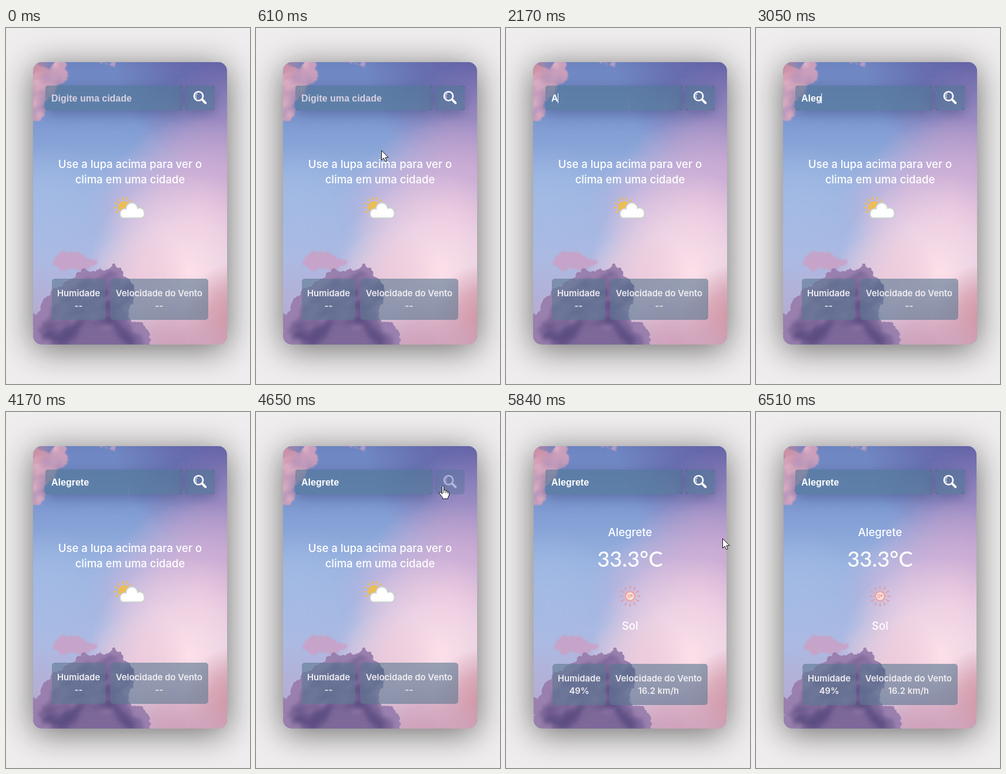
These frames come from a looping animation (415x605 px, 7460 ms). An HTML page with a canvas:

```html
<!DOCTYPE html>
<html lang="pt-BR">
<head>
<meta charset="utf-8">
<title>Clima</title>
<style>
  html, body { margin: 0; width: 100%; height: 100%; overflow: hidden; background: #efedee; }
  canvas { display: block; }
</style>
</head>
<body>
<canvas id="stage" width="415" height="605"></canvas>
<script>
const W = 415, H = 605, LOOP = 7460, STEP = 69;
const ctx = document.getElementById('stage').getContext('2d');
const HEADING = '500 18.5px Inter, sans-serif';
const STAT = '600 14.8px Inter, sans-serif';
const DEGREES = '500 36.5px Lato, sans-serif';
const FIELD = 'bold 16px "Liberation Sans", Arial, sans-serif';
const RESULT_AT = 5040;

const typed = [[2170, 'A'], [2370, 'l'], [2500, 'e'], [3050, 'g'],
               [3250, 'r'], [3380, 'e'], [3510, 't'], [3640, 'e']];

function seeded(seed) {
  return () => (seed = seed * 16807 % 2147483647) / 2147483647;
}

// Closed outline roughened by midpoint displacement.
function roughPath(points, random, wobble = .3) {
  const path = new Path2D();
  const split = (ax, ay, bx, by, depth) => {
    if (!depth) return path.lineTo(bx, by);
    const k = (random() - .5) * wobble * 2;
    const mx = (ax + bx) / 2 + (by - ay) * k, my = (ay + by) / 2 - (bx - ax) * k;
    split(ax, ay, mx, my, depth - 1);
    split(mx, my, bx, by, depth - 1);
  };
  path.moveTo(...points[0]);
  points.forEach((p, i) => split(...p, ...points[(i + 1) % points.length], 3));
  path.closePath();
  return path;
}

function paintSky() {
  const layer = document.createElement('canvas');
  layer.width = W;
  layer.height = H;
  const c = layer.getContext('2d');
  const random = seeded(71);

  const base = c.createLinearGradient(0, 58, 0, 538);
  [[0, '#6d84c0'], [.2, '#7c98d0'], [.42, '#98b3e0'], [.7, '#adb9e2'], [1, '#b9a6ca']]
    .forEach(([at, color]) => base.addColorStop(at, color));
  c.fillStyle = base;
  c.fillRect(0, 0, W, H);

  const glow = (x, y, r, rgb, alpha) => {
    const g = c.createRadialGradient(x, y, 0, x, y, r);
    g.addColorStop(0, `rgba(${rgb},${alpha})`);
    g.addColorStop(.5, `rgba(${rgb},${alpha * .65})`);
    g.addColorStop(1, `rgba(${rgb},0)`);
    c.fillStyle = g;
    c.fillRect(0, 0, W, H);
  };
  glow(385, 50, 200, '98,92,162', .9);
  glow(385, 225, 170, '180,150,200', .9);
  glow(225, 300, 90, '196,180,220', .6);
  glow(330, 310, 160, '222,184,218', .9);
  glow(310, 415, 170, '253,224,232', 1);
  glow(225, 430, 90, '240,200,216', .7);
  glow(390, 490, 90, '208,142,156', .9);
  glow(290, 550, 100, '208,156,180', .9);
  glow(70, 310, 110, '166,190,230', .6);

  const fill = (points, color, blur = 0) => {
    const path = roughPath(points, random);
    c.filter = blur ? `blur(${blur}px)` : 'none';
    c.fillStyle = color;
    c.fill(path);
    c.filter = 'none';
    return path;
  };
  // Soft wisps scattered inside a cloud.
  const mottle = (path, count, x, y, w, h, colors) => {
    c.save();
    c.clip(path);
    c.filter = 'blur(3px)';
    for (let i = 0; i < count; i++) {
      c.fillStyle = colors[i % colors.length];
      c.beginPath();
      c.ellipse(x + random() * w, y + random() * h, 5 + random() * 12, 3 + random() * 6, -.4, 0, 7);
      c.fill();
    }
    c.restore();
  };

  const corner = fill([[40, 50], [108, 50], [100, 70], [106, 82], [86, 98], [82, 114], [66, 124], [66, 146], [40, 156]],
    'rgba(212,162,188,.9)', 1);
  mottle(corner, 24, 44, 56, 60, 96, ['rgba(240,190,200,.6)', 'rgba(176,148,192,.5)']);
  glow(46, 58, 36, '204,134,150', .7);
  fill([[150, 50], [190, 50], [186, 67], [176, 63]], 'rgba(196,162,198,.8)', 1);
  fill([[78, 402], [90, 384], [112, 380], [130, 386], [156, 394], [142, 406], [116, 410], [96, 414]],
    'rgba(202,160,198,.85)', 1);

  const bank = fill([[40, 544], [40, 486], [64, 460], [84, 442], [104, 430], [120, 416], [142, 414], [160, 408],
    [174, 410], [184, 400], [194, 407], [200, 422], [214, 434], [216, 456], [208, 480], [222, 500], [240, 512], [246, 528], [242, 544]],
    '#9a80ae', .6);
  fill([[70, 544], [60, 500], [92, 462], [116, 440], [136, 428], [160, 424], [178, 412], [190, 418], [200, 444],
    [196, 480], [212, 506], [230, 520], [232, 544]], '#7d689a', 3);
  mottle(bank, 40, 56, 415, 180, 105, ['rgba(158,130,176,.4)', 'rgba(94,76,130,.45)']);
  fill([[46, 544], [60, 516], [100, 506], [130, 494], [160, 500], [190, 498], [206, 516], [214, 544]],
    'rgba(86,72,124,.8)', 5);
  return layer;
}
const sky = paintSky();

function box(x, y, w, h, r) {
  ctx.beginPath();
  ctx.roundRect(x, y, w, h, r);
}

function label(text, x, y, font, color = '#fff', align = 'center') {
  ctx.font = font;
  ctx.fillStyle = color;
  ctx.textAlign = align;
  ctx.fillText(text, x, y);
}

function disc(x, y, r) {
  ctx.beginPath();
  ctx.arc(x, y, r, 0, 7);
}

function card(x, w) {
  ctx.fillStyle = '#efedee';
  ctx.fillRect(0, 0, W, H);
  ctx.save();
  ctx.shadowColor = 'rgba(0,0,0,.55)';
  ctx.shadowBlur = 56;
  ctx.shadowOffsetY = 8;
  ctx.fillStyle = '#8d9acb';
  box(x, 58, w, 480, 15);
  ctx.fill();
  ctx.restore();
  ctx.save();
  ctx.clip();
  ctx.drawImage(sky, (x - 46) * 2, 0);
  ctx.restore();
}

function panel(x, y, w, h, color, shadow) {
  ctx.save();
  box(x, y, w, h, 5);
  if (shadow) {
    // Keep the shadow outside the translucent panel.
    ctx.save();
    const outside = new Path2D();
    outside.rect(0, 0, W, H);
    outside.roundRect(x, y, w, h, 5);
    ctx.clip(outside, 'evenodd');
    ctx.shadowColor = 'rgba(70,75,130,.55)';
    ctx.shadowBlur = 22;
    ctx.shadowOffsetY = 5;
    ctx.fillStyle = '#000';
    ctx.fill();
    ctx.restore();
  }
  ctx.fillStyle = color;
  ctx.fill();
  ctx.restore();
}

function searchBar(t, hover) {
  panel(67, 98, 233, 42, 'rgba(80,118,150,.65)', true);
  panel(305, 98, 50, 42, `rgba(80,116,150,${hover ? .4 : .65})`, !hover);

  const text = typed.filter(([at]) => t >= at).map(([, ch]) => ch).join('');
  if (text) label(text, 77, 125, FIELD, '#fff', 'left');
  else label('Digite uma cidade', 77, 125, FIELD, '#d8d0e2', 'left');
  if ((t >= 1320 && t < 1770) || (t >= 2170 && t < 4170)) {
    ctx.font = FIELD;
    ctx.fillStyle = '#fff';
    ctx.fillRect(Math.floor(77 + ctx.measureText(text).width), 111, 1, 17);
  }

  ctx.strokeStyle = hover ? '#b5b5dc' : '#fff';
  ctx.lineCap = 'round';
  ctx.lineWidth = 2.6;
  disc(327.5, 115.8, 7.6);
  ctx.stroke();
  ctx.lineWidth = 1.2;
  ctx.beginPath();
  ctx.arc(327.5, 115.8, 4.6, 2.4, 4.2);
  ctx.stroke();
  ctx.lineWidth = 4;
  ctx.beginPath();
  ctx.moveTo(334.5, 122.5);
  ctx.lineTo(339.3, 127.3);
  ctx.stroke();
}

function partlyCloudy() {
  ctx.strokeStyle = ctx.fillStyle = '#ecbd58';
  disc(201, 304.5, 10.5);
  ctx.fill();
  ctx.lineWidth = 2.8;
  ctx.lineCap = 'round';
  for (let i = 0; i < 7; i++) {
    const a = 2.6 + i * .48, dx = Math.cos(a), dy = Math.sin(a);
    ctx.beginPath();
    ctx.moveTo(201 + dx * 14.5, 304.5 + dy * 14.5);
    ctx.lineTo(201 + dx * 16.5, 304.5 + dy * 16.5);
    ctx.stroke();
  }
  const cloud = (grow, color) => {
    ctx.fillStyle = color;
    for (const [x, y, r] of [[202, 315, 7], [214, 307, 9], [227, 314, 7.5]]) {
      disc(x, y, r + grow);
      ctx.fill();
    }
    box(195 - grow, 311 - grow, 39.5 + 2 * grow, 11 + 2 * grow, 6);
    ctx.fill();
  };
  cloud(2, '#cbd0d0');
  cloud(0, '#fff');
}

function sunny() {
  ctx.strokeStyle = ctx.fillStyle = '#d79fa8';
  ctx.lineWidth = 1.2;
  for (let i = 0; i < 12; i++) {
    const a = i * Math.PI / 6, dx = Math.cos(a), dy = Math.sin(a);
    ctx.beginPath();
    ctx.moveTo(211 + dx * 11.5, 313 + dy * 11.5);
    ctx.lineTo(211 + dx * 15, 313 + dy * 15);
    ctx.stroke();
    disc(211 + dx * 16, 313 + dy * 16, 1.6);
    ctx.fill();
  }
  ctx.fillStyle = '#f8e2e2';
  ctx.strokeStyle = '#efa39c';
  ctx.lineWidth = 2.5;
  disc(211, 313, 7.8);
  ctx.fill();
  ctx.stroke();
  ctx.lineWidth = 1.2;
  ctx.strokeRect(207.5, 310.5, 3, 5);
  ctx.strokeRect(212.5, 310.5, 2, 3);
}

function stats(x1, x2, y, humidity, wind) {
  const ink = '#f0edf2', fill = 'rgba(92,122,148,.62)';
  [[x1, 91, 'Humidade', humidity], [x2, 167, 'Velocidade do Vento', wind]].forEach(([x, w, name, value]) => {
    panel(x, y, w, 70, fill);
    label(name, x + w / 2, y + 30, STAT, ink);
    label(value, x + w / 2, y + 51, STAT, ink);
  });
}

function weather(done) {
  if (done) {
    label('Alegrete', 211, 211, HEADING);
    label('33.3°C', 211, 263, DEGREES);
    sunny();
    label('Sol', 211, 370, HEADING);
    stats(79, 176, 428, '49%', '16.2 km/h');
  } else {
    label('Use a lupa acima para ver o', 211, 238, HEADING);
    label('clima em uma cidade', 211, 264, HEADING);
    partlyCloudy();
    stats(78, 177, 426, '--', '--');
  }
}

function pointer(t) {
  if (t < 130) return null;
  if (t < 890) {
    const left = 1 - Math.min(10, Math.floor((t - 128) / STEP)) / 10;
    return ['arrow', 202 + 163 * left ** 2.24, 148 + 429 * left ** 1.63];
  }
  if (t < 4500) return ['beam', 208, t < 960 ? 138 : t < 1040 ? 136 : 135];
  if (t < 4580) return ['beam', 236, 132];
  if (t < 4650) return ['beam', 285, 128];
  if (t < 5700) return ['hand', t < 4700 ? 318 : t < 4770 ? 326 : 329, 125];
  if (t < 6110) {
    const u = (1 + Math.floor((t - 5700) / STEP)) / 7;
    return ['arrow', 329 + 90 * u, 125 + 270 * u ** 1.3];
  }
  if (t >= 6370 && t < 6510) return t < 6440 ? ['arrow', 404, 548] : ['arrow', 397, 579];
  return null;
}

const arrowShape = new Path2D('M.5.5V16.5L4.2 13L6.8 18.7L9.4 17.6L6.8 12H11.8Z');
const handShape = new Path2D('M-1.5 1.5Q0-1 1.5 1.5V8Q4 6.5 5 9Q7.5 8 8 10.5Q10.5 10 10.5 13V16Q10 18 8.5 20V22.5H-.5V20.5L-6 13.5Q-6.5 11-4 11.5L-1.5 14Z');

function drawPointer([kind, x, y]) {
  ctx.save();
  ctx.translate(Math.round(x), Math.round(y));
  ctx.lineWidth = 1;
  if (kind === 'beam') {
    ctx.strokeStyle = 'rgba(130,145,155,.4)';
    ctx.stroke(new Path2D('M-3-7.5H-1L.5-6.5L2-7.5H4M.5-6.5V7M-3 8H-1L.5 7L2 8H4'));
  } else {
    const shape = kind === 'hand' ? handShape : arrowShape;
    ctx.fillStyle = '#fff';
    ctx.strokeStyle = '#111';
    ctx.fill(shape);
    ctx.stroke(shape);
    if (kind === 'hand') ctx.stroke(new Path2D('M1.5 8V12M5 9V12.5M8 10.5V13'));
  }
  ctx.restore();
}

function click(x, y) {
  ctx.fillStyle = 'rgba(196,204,48,.8)';
  disc(x, y, 12);
  ctx.fill();
}

function draw(t) {
  const done = t >= RESULT_AT;
  card(done ? 47 : 46, done ? 328 : 330);
  searchBar(t, t >= 4650 && t < 5700);
  weather(done);
  const cursor = pointer(t);
  if (cursor) drawPointer(cursor);
  if (t >= 1240 && t < 1320) click(205, 134);
  if (t >= 4970 && t < 5040) click(329, 128);
}

const start = performance.now();
function tick() {
  draw((performance.now() - start) % LOOP);
  requestAnimationFrame(tick);
}
tick();
</script>
</body>
</html>
```
